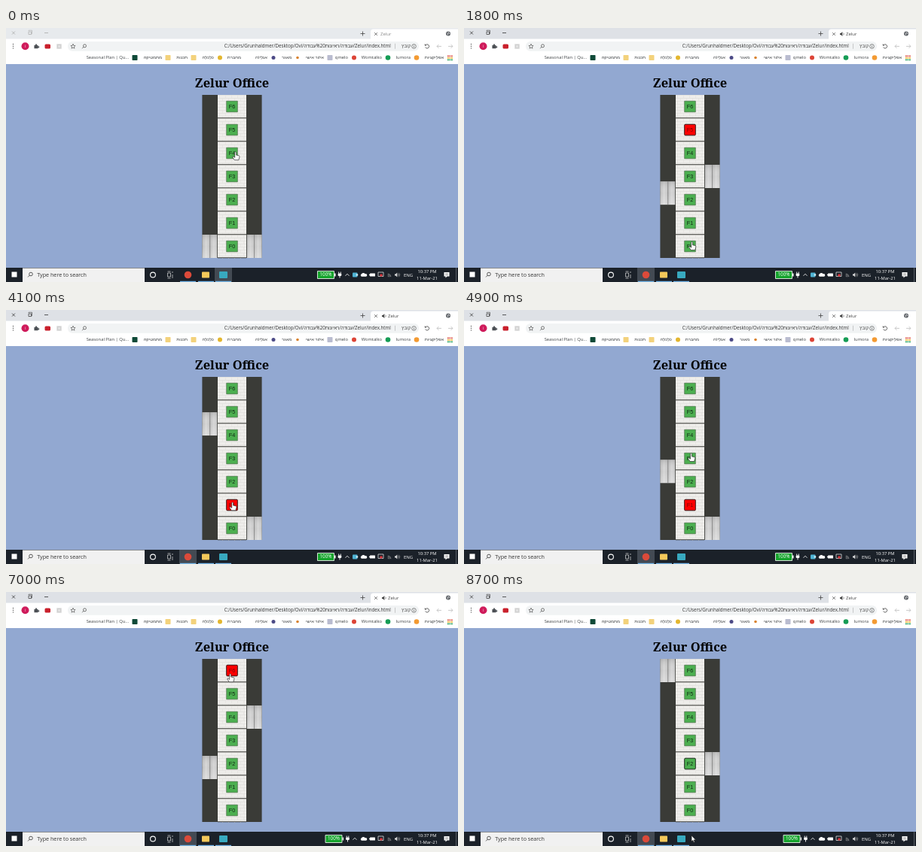
An HTML page with a canvas for the animation above (8.8 s loop, 600 by 338 pixels).

```html
<!DOCTYPE html>
<html lang="en">
<head>
<meta charset="utf-8">
<title>Zelur</title>
<style>
  html, body { margin: 0; width: 100%; height: 100%; overflow: hidden; background: #92a8d1; }
  canvas { display: block; width: 100vw; height: 100vh; }
</style>
</head>
<body>
<canvas id="stage"></canvas>
<script>
const W = 600, H = 338, LOOP = 8800, STEP = 100;
const SPEED = 0.079;            // lift speed in px per ms
const FLOOR_H = 31, UI = '"Open Sans", "Liberation Sans", sans-serif';
const canvas = document.getElementById('stage');
const ctx = canvas.getContext('2d');
const scale = window.devicePixelRatio || 1;
canvas.width = W * scale;
canvas.height = H * scale;

const floorTop = floor => 275 - FLOOR_H * floor;

// Each call: which lift answers, its floors, and when the button is pressed.
const trips = [
  { lift: 1, from: 0, to: 3, start: 357 },
  { lift: 0, from: 0, to: 5, start: 903 },
  { lift: 1, from: 3, to: 0, start: 2740 },
  { lift: 0, from: 5, to: 1, start: 3897 },
  { lift: 1, from: 0, to: 4, start: 5357 },
  { lift: 0, from: 1, to: 6, start: 6671 },
  { lift: 1, from: 4, to: 2, start: 7450 }
];
for (const trip of trips)
  trip.end = trip.start + Math.abs(trip.to - trip.from) * FLOOR_H / SPEED;
const isFocused = t => t >= trips[0].start;   // the first click activates the window

// Pointer tip: time, x, y
const pointerKeys = [
  [0, 304, 165], [300, 301, 195], [420, 301, 195], [750, 298, 137], [1000, 298, 137],
  [1900, 302, 290], [2900, 302, 290], [3700, 300, 256], [4300, 300, 256],
  [5200, 301, 168], [5420, 301, 168], [5750, 300, 113], [6100, 300, 113],
  [6500, 297, 109], [7050, 297, 109], [7350, 301, 229], [7650, 301, 229],
  [8500, 302, 324], [8800, 302, 324]
];

// Label, icon centre, icon colour, icon radius when round
const bookmarks = [
  ['Seasonal Plan | Qu...', 171, '#0f4a38'], ['מתמטיקה', 215, '#f3d27c'],
  ['תכנות', 249, '#f3d27c'], ['כלכלה', 284, '#e3b62f', 3], ['מחברת', 320, '#fff'],
  ['אנליזה', 355, '#4c4a86', 2.5], ['מאגר', 387, '#d9832f', 1.8], ['איזור אישי', 430, '#b9bcd0'],
  ['qmelo', 462, '#dc4437', 3], ['Womtalko', 507, '#159c55', 3.3],
  ['lumora', 545, '#f39a32', 3.3], ['אפליקציות', 589, '']
];

function rect(x, y, w, h, fill, radius = 0) {
  ctx.fillStyle = fill;
  ctx.beginPath();
  ctx.roundRect(x, y, w, h, radius);
  ctx.fill();
}
function frame(x, y, w, h, color, width = 0.8, radius = 0) {
  ctx.strokeStyle = color;
  ctx.lineWidth = width;
  ctx.beginPath();
  ctx.roundRect(x, y, w, h, radius);
  ctx.stroke();
}
function disc(x, y, r, fill) {
  ctx.fillStyle = fill;
  ctx.beginPath();
  ctx.arc(x, y, r, 0, 7);
  ctx.fill();
}
function ring(x, y, r, color, width = 0.8, from = 0, to = 7) {
  ctx.strokeStyle = color;
  ctx.lineWidth = width;
  ctx.beginPath();
  ctx.arc(x, y, r, from, to);
  ctx.stroke();
}
function path(d, x, y, stroke, fill, width = 0.8, size = 1) {
  const shape = new Path2D(d);
  ctx.save();
  ctx.translate(x, y);
  ctx.scale(size, size);
  if (fill) { ctx.fillStyle = fill; ctx.fill(shape); }
  if (stroke) { ctx.strokeStyle = stroke; ctx.lineWidth = width; ctx.stroke(shape); }
  ctx.restore();
}
function text(str, x, y, size, color, align = 'left', font = UI, weight = 400) {
  ctx.font = `${weight} ${size}px ${font}`;
  ctx.fillStyle = color;
  ctx.textAlign = align;
  ctx.textBaseline = 'middle';
  ctx.direction = 'ltr';
  ctx.fillText(str, x, y);
}
function gradient(x0, y0, x1, y1, ...colors) {
  const fill = ctx.createLinearGradient(x0, y0, x1, y1);
  colors.forEach((color, i) => fill.addColorStop(i / (colors.length - 1), color));
  return fill;
}
function magnifier(x, y, color, r = 2) {
  ring(x, y, r, color);
  path(`M${-r * .7} ${r * .7}l${-r} ${r}`, x, y, color);
}
function speaker(x, y, color) {
  path('M-3 -1h1.3l2 -2v6l-2 -2h-1.3z', x, y, null, color);
  ring(x + .5, y, 1.7, color, .6, -1, 1);
}
const CROSS = 'M-2 -2l4 4M2 -2l-4 4';

function drawBrowser(t) {
  const control = isFocused(t) ? '#333' : '#aaa';
  const tabInk = isFocused(t) ? '#444' : '#888';
  rect(0, 0, W, 15, isFocused(t) ? '#dee1e6' : '#e7eaed');
  rect(484, 1.5, W - 484, 14, '#fff', [4, 0, 0, 0]);
  rect(0, 14.5, W, 34, '#fff');
  path(CROSS, 10, 6.5, control);
  frame(30, 5, 3.5, 3.5, control, .7);
  path('M-1 -1.8v-1h4.5v4.5h-1', 31, 6, control, null, .6);
  path('M-2.5 0h5', 53.5, 6.5, control);
  path('M-3 0h6M0 -3v6', 473.5, 7.5, '#444');
  path(CROSS, 491, 8, '#555', null, .7);
  if (t >= 1600) speaker(502, 8, '#444');
  text('Zelur', t >= 1600 ? 507 : 497, 8, 6, tabInk);
  disc(587, 7.5, 3, '#5f6368');
  path('M-1.8 -1l1.5 1.2l-.5 1.8M.4 -2l.4 1.5l1.5 .5', 587, 7.5, '#fff', null, .7);

  for (const dy of [-2.7, 0, 2.7]) disc(9.5, 24.2 + dy, .7, '#555');
  disc(25.5, 24.2, 5, '#cf1b5b');
  text('i', 25.5, 24.2, 5, '#fff', 'center');
  path('M-3 -1.5h2a1.2 1.2 0 1 1 2 0h2v2a1.2 1.2 0 1 1 0 1.6v1.4h-6z', 40, 24.2, null, '#4b4f54', 0, .85);
  rect(51.5, 21.5, 7.5, 6, '#c9202c', 1.5);
  rect(67, 21, 7, 7, '#e2e2e2', 1);
  frame(68.5, 22.5, 4, 4, '#c4c4c4', .6);
  rect(82, 18, 466, 12.8, '#f1f3f4', 6);
  path('M0 -3.2L.9 -1L3.1 -.9L1.4 .6L2 2.8L0 1.6L-2 2.8L-1.4 .6L-3.1 -.9L-.9 -1z', 89, 24.4, '#555', null, .7);
  magnifier(104.5, 23.8, '#555');
  text('C:/Users/Grunhaldmer/Desktop/Ovi/עבודה/ראיונות%20עבודה/Zelur/index.html',
    511, 24.6, 6.2, '#333', 'right');
  rect(516, 20.8, .6, 7, '#aaa');
  text('קובץ', 537, 24.6, 6.2, '#555', 'right');
  ring(541.5, 24.4, 2.8, '#555', .7);
  path('M0 -.3v1.8M0 -1.6v.7', 541.5, 24.4, '#555', null, .7);
  ring(559, 24.4, 2.6, '#555', .9, -2.4, 2.7);
  path('M-.8 -1h-2.4v-2.4z', 559, 24.4, null, '#555');
  path('M3 0h-6m2.4 -2.4l-2.4 2.4l2.4 2.4', 575, 24.4, '#bbb');
  path('M-3 0h6m-2.4 -2.4l2.4 2.4l-2.4 2.4', 590, 24.4, '#bbb');

  for (const [label, x, color, radius] of bookmarks) {
    if (radius) disc(x, 39.5, radius, color);
    else if (color) rect(x - 3.5, 36, 7, 7, color, .8);
    text(label, x - 8, 39.5, 5.8, '#3c4043', 'right');
  }
  ['#dc4437', '#f0b429', '#159c55'].forEach((color, row) => {
    for (let col = 0; col < 3; col++)
      rect(586 + col * 2.5, 36.5 + row * 2.5, 1.7, 1.7, color);
  });
}

function drawLift(x, y) {
  const door = 10.2;
  for (const left of [x, x + door])
    rect(left, y, door, FLOOR_H, gradient(left, 0, left + door, 0, '#bcbcbc', '#d6d6d6', '#c4c4c4'));
  rect(x, y, 2 * door, FLOOR_H,
    gradient(0, y, 0, y + FLOOR_H, '#8885', '#fff0', '#fff4'));
  rect(x + door - .2, y, .8, FLOOR_H, '#8a8a8a');
}

function drawFloor(floor, called, focused) {
  const y = floorTop(floor);
  rect(281, y, 38, FLOOR_H, '#efeeeb');
  for (let row = 0; row < 8; row++) {
    rect(281, y + row * 4, 38, .6, '#dad9d5');
    for (let x = 283 + row % 2 * 4; x < 319; x += 8)
      rect(x, y + row * 4, .6, 4, '#e2e1dd');
  }
  rect(281, y + 30.3, 38, 1, '#383935');
  const radius = focused ? 1.2 : 0;
  rect(292.5, y + 8, 15, 15, called ? '#ff0000' : '#4caf50', radius);
  frame(292.7, y + 8.2, 14.6, 14.6, focused ? '#1c1c1c' : '#64755f', focused ? .9 : .7, radius);
  text('F' + floor, 300, y + 15.8, 7.2, called ? '#740808' : '#102713', 'center',
    '"Liberation Sans", sans-serif');
}

function drawBuilding(t) {
  rect(0, 48, W, 272, '#92a8d1');
  text('Zelur Office', 300, 74.3, 16.4, '#000', 'center', '"Noto Serif", serif', 800);
  rect(260.4, 89, 79.2, 217, '#3a3b37');
  const liftY = [floorTop(0), floorTop(0)];
  const called = new Set();
  let focused = -1;
  for (const { lift, from, to, start, end } of trips) {
    if (t < start) continue;
    focused = to;
    if (t < end) called.add(to);
    const done = Math.min(1, (t - start) / (end - start));
    liftY[lift] = floorTop(from + (to - from) * done);
  }
  drawLift(260.4, liftY[0]);
  drawLift(319.2, liftY[1]);
  rect(280.3, 89, .8, 217, '#383935');
  rect(319, 89, .8, 217, '#383935');
  for (let floor = 0; floor < 7; floor++)
    drawFloor(floor, called.has(floor), focused === floor);
}

function drawTaskbar(t) {
  rect(0, 319, W, 19, '#1b2129');
  rect(7.5, 324.5, 7, 7, '#fff');
  rect(22, 319.5, 162, 18.5, '#f1f1f1');
  magnifier(33, 327.5, '#333', 2.3);
  text('Type here to search', 41.2, 328.8, 7.2, '#333');
  ring(195, 328.5, 3.4, '#fff', 1.1);
  frame(214.5, 326, 4, 5, '#ddd', .7);
  path('M0 0v2M0 4v5M-6.5 0h4M-6.5 9h4', 221, 324, '#ddd', null, .7);
  rect(isFocused(t) ? 230 : 277, 319, 23, 19, '#434a53');
  disc(241.5, 328.5, 4.8, '#db4a3a');
  rect(260, 324.5, 10, 8, '#f4c85a', .8);
  rect(283, 324, 11, 9, '#38a9bf', 1);
  for (const x of [231, 255, 278]) rect(x, 336.8, 21, 1.2, '#76b9ed');

  const trayIcon = t < 5000, shift = trayIcon ? 0 : 10.5;
  rect(413.5 + shift, 323.5, 22, 10, '#15a32c');
  frame(413.5 + shift, 323.5, 22, 10, '#e8efe8', .9);
  rect(436 + shift, 326.5, 1.6, 4, '#e8efe8');
  text('100%', 424.5 + shift, 328.8, 6.3, '#fff', 'center');
  path('M-1.3 -4v2.2M1.3 -4v2.2M0 1v3', 443 + shift, 328.5, '#fff', null, .9);
  rect(440.7 + shift, 326.5, 4.6, 3.5, '#fff', 1);
  path('M-2.5 1.3l2.5 -2.6l2.5 2.6', 453 + shift * .95, 328.5, '#fff');
  if (trayIcon) {
    const alert = t >= 2300 && t < 3000;
    rect(460, 325.5, 6.5, 6, alert ? '#f2a51e' : '#4fb3d4', 1);
    if (!alert) disc(466, 328.5, 1.3, '#dceff5');
  }
  path('M-3 2.2a1.8 1.8 0 0 1 0 -3.4a2.7 2.7 0 0 1 4.7 0a1.8 1.8 0 0 1 1.4 3.4z', 475, 328.5, null, '#fff');
  rect(483, 326.5, 7, 4, '#fff', .6);
  rect(482, 327.7, 1, 1.6, '#fff');
  frame(494, 325, 7, 5.5, '#ddd', .8);
  disc(498, 329, 1.8, '#d9343b');
  for (const r of [1.5, 3, 4.5]) ring(506.5, 331.5, r, '#aaa', .7, -1.5, -.1);
  speaker(519, 328.5, '#ddd');
  ring(519.5, 328.5, 3.2, '#aaa', .6, -1, 1);
  text('ENG', 534, 329, 6, '#fff', 'center');
  text('10:37 PM', 559, 324.5, 5.8, '#fff', 'center');
  text('11-Mar-21', 559, 333, 5.8, '#fff', 'center');
  path('M-3.5 -3.5h7v5.5h-3l-2 2v-2h-2z', 585, 328.5, null, '#fff');
  path('M-2 -1.7h4M-2 .2h4', 585, 328.5, '#555', null, .6);
  rect(597, 319, .7, 19, '#737982');
}

function pointerAt(t) {
  const i = pointerKeys.findIndex(key => key[0] > t);
  const [t0, x0, y0] = pointerKeys[i - 1], [t1, x1, y1] = pointerKeys[i];
  const p = (t - t0) / (t1 - t0), ease = p * p * (3 - 2 * p);
  return [x0 + (x1 - x0) * ease, y0 + (y1 - y0) * ease];
}

function drawPointer(t) {
  const [x, y] = pointerAt(t);
  const row = (y - 89) % FLOOR_H;
  const overButton = x > 292 && x < 308 && y < 306 && row > 7.5 && row < 23.3;
  if (overButton)
    path('M-.9 .7Q0 -.5 .9 .7V4L4 4.6Q5 5 4.8 6.2L3.8 10H-1.2L-3.6 6.6Q-3.7 5.3 -2.3 5.8L-.9 7z',
      x + .7, y - .3, '#222', '#fff', .6, 1.1);
  else
    path('M0 0V8L1.8 6.4L3 9.2L4.3 8.6L3.1 5.9H5.6z', x, y, '#222', '#fff', .7);
}

function render(now) {
  const t = Math.floor(now % LOOP / STEP) * STEP;
  ctx.setTransform(scale, 0, 0, scale, 0, 0);
  drawBrowser(t);
  drawBuilding(t);
  drawTaskbar(t);
  drawPointer(t);
  requestAnimationFrame(render);
}
requestAnimationFrame(render);
</script>
</body>
</html>
```
